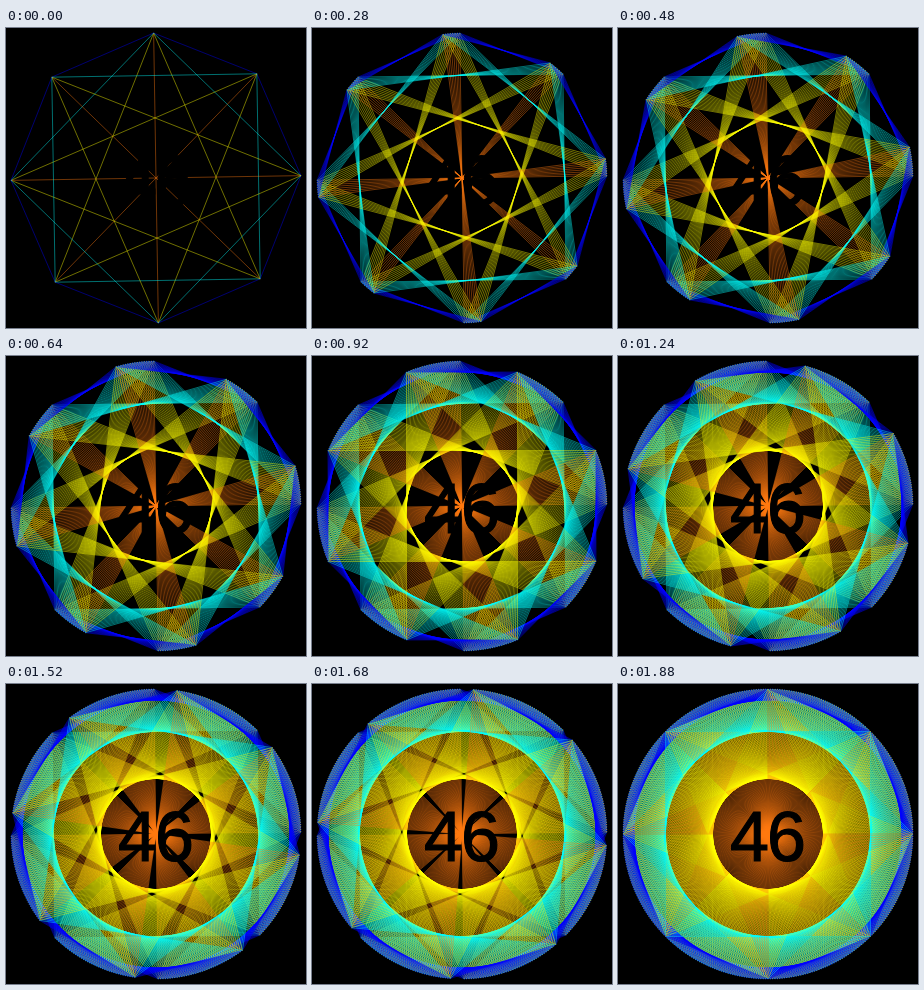
Recreate the animation shown at these times as an HTML page with a canvas. Size 300 px wide and 300 px high, loop 1.92 s.

```html
<!DOCTYPE html>
<html>
<head>
<meta charset="utf-8">
<style>
  html, body { margin: 0; width: 100%; height: 100%; overflow: hidden; background: #000; }
  canvas { display: block; }
</style>
</head>
<body>
<canvas id="stage" width="300" height="300"></canvas>
<script>
const ctx = document.getElementById('stage').getContext('2d');
const FRAMES = 48, FRAME_MS = 40, SIDES = 8, CENTER = 150, RADIUS = 145;
const TURN = 2 * Math.PI / SIDES;
// Chord colours, indexed by the number of sides spanned
const COLORS = ['', '#00f', '#0ff', '#ff0', '#ff7a10'];

const vertex = angle => [CENTER + RADIUS * Math.sin(angle), CENTER - RADIUS * Math.cos(angle)];

// All chords of an octagon turned anticlockwise by the given angle
function drawStar(angle) {
  for (let i = 0; i < SIDES; i++) {
    for (let j = i + 1; j < SIDES; j++) {
      ctx.strokeStyle = COLORS[Math.min(j - i, SIDES - j + i)];
      ctx.beginPath();
      ctx.moveTo(...vertex(i * TURN - angle));
      ctx.lineTo(...vertex(j * TURN - angle));
      ctx.stroke();
    }
  }
}

function drawLabel(text) {
  ctx.font = '70px "Liberation Sans", Arial, sans-serif';
  ctx.letterSpacing = '-2px';
  ctx.textAlign = 'center';
  ctx.strokeStyle = '#000';
  ctx.lineWidth = 1.2;
  ctx.fillText(text, CENTER - 1, 177);
  ctx.strokeText(text, CENTER - 1, 177);
}

function draw(frame) {
  ctx.fillStyle = '#000';
  ctx.fillRect(0, 0, 300, 300);
  ctx.lineWidth = 0.44;
  for (let k = 1; k <= frame + 1; k++) drawStar(k * TURN / FRAMES);
  drawLabel('46');
}

const start = performance.now();
let shown = -1;
function tick() {
  const frame = Math.floor((performance.now() - start) / FRAME_MS) % FRAMES;
  if (frame !== shown) draw(shown = frame);
  requestAnimationFrame(tick);
}
tick();
</script>
</body>
</html>
```
